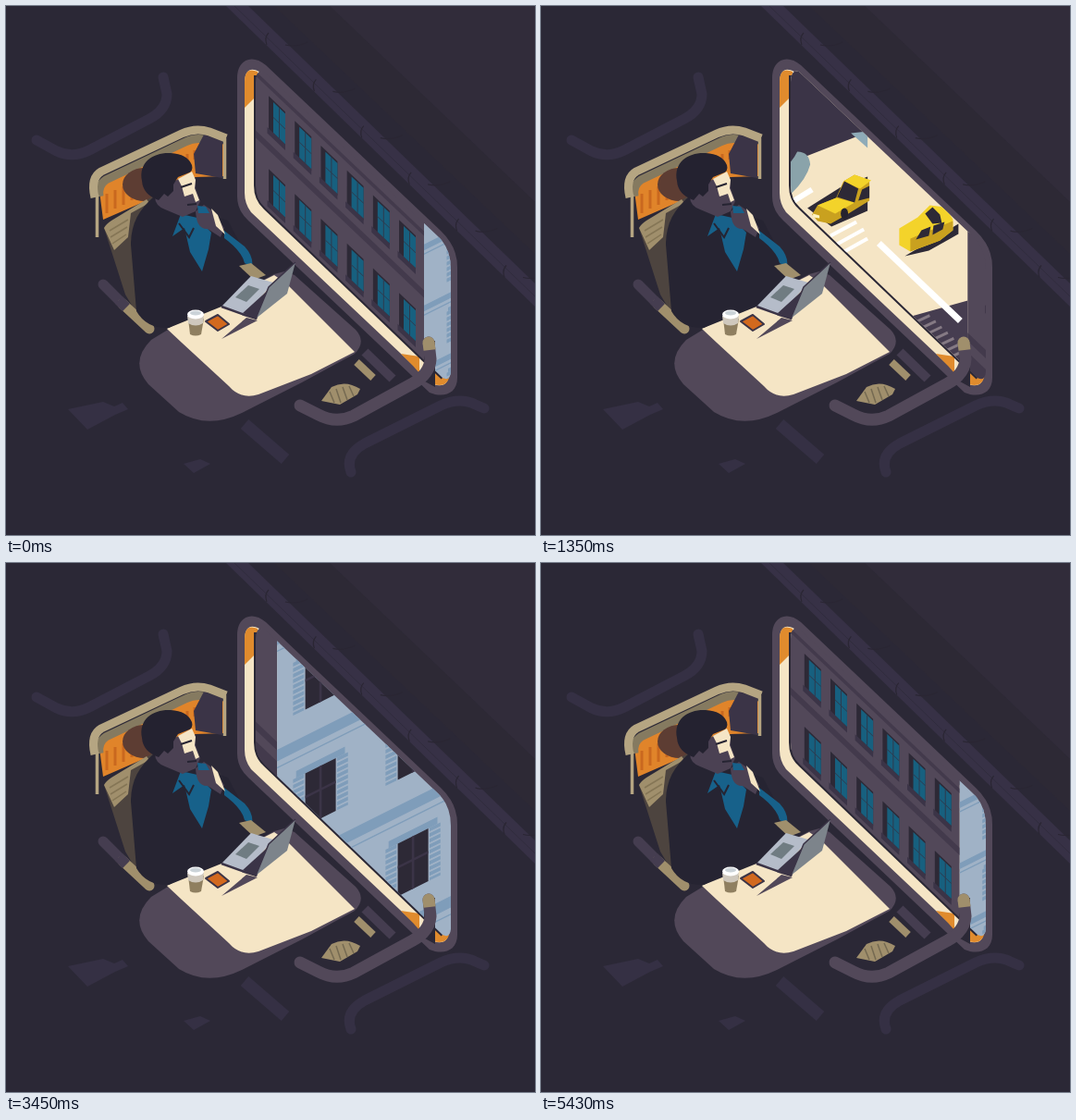
Write an HTML page that moves like this. It is 572x572 px and loops after 5.46 s.

```html
<!DOCTYPE html>
<html lang="en">
<head>
<meta charset="utf-8">
<title>Window seat</title>
<style>
html, body { margin: 0; width: 100%; height: 100%; overflow: hidden; background: #2b2836; }
svg { display: block; width: 100vw; height: 100vh; }
</style>
</head>
<body>
<svg viewBox="0 0 572 572" fill="none">
  <defs>
    <clipPath id="pane"><path d="M270 82Q270 68 279 71L467 249Q481 262 481 284V396Q480 406 472 402L280 218Q270 209 270 194Z"/></clipPath>
  </defs>

  <!-- carriage wall -->
  <path d="M350 0H572V212Z" fill="#312c3a"/>
  <path d="M290 0H350L572 212V268Z" fill="#2d2935"/>
  <path d="M238 0H262L572 300V325Z" fill="#373146"/>
  <path d="M247 0L572 314" stroke="#302c3d"/>
  <g id="joints" stroke="#2a2633" stroke-width="1.2"></g>

  <!-- faint furniture -->
  <g stroke="#353044" stroke-width="11" stroke-linecap="round">
    <path d="M33 145L55 157Q72 165 90 156L155 122Q174 112 174 95L170 77"/>
    <path d="M373 504Q366 485 388 473L470 432Q488 424 503 429L517 435"/>
    <path d="M258 452L302 490" stroke-width="13" stroke-linecap="butt"/>
  </g>
  <path d="M67 436L105 428L117 433L126 429L132 436L118 442L88 458ZM192 495L210 490L221 495L203 505Z" fill="#353044"/>

  <!-- window -->
  <path d="M250 78C250 58 266 51 281 64L470 243Q488 260 488 282V402C488 420 472 424 458 418L262 232Q250 221 250 206Z" fill="#524859"/>
  <path d="M258 84Q258 63 274 71L464 251Q479 264 479 284V398Q478 414 462 409L265 223Q258 214 258 202Z" fill="#f5e5c5"/>
  <path d="M258 110V82Q258 65 272 71V96ZM427 376L447 379V397L440 389ZM452 398L480 396Q479 414 462 409Z" fill="#e08b2d"/>
  <path d="M270 75V194Q270 209 280 218L472 402" stroke="#2b2836" stroke-width="4"/>
  <g clip-path="url(#pane)">
    <g id="world"><g id="city"></g><use id="again" href="#city"/></g>
  </g>

  <!-- seat -->
  <path d="M100 192L200 143L215 141L236 150V184L205 185L160 207L105 231Z" fill="#e0842a"/>
  <path d="M109 203V224M118 199V219M127 195V215M136 191V210M145 187V205M178 168V180M187 164V176M196 160V170M204 156V166" stroke="#c9681f" stroke-width="3"/>
  <path d="M101 206Q99 194 108 188L194 147Q204 142 214 144" stroke="#857a60" stroke-width="9"/>
  <path d="M203 160L214 139L234 146V186L205 181Z" fill="#3b3447"/>
  <path d="M98.500 250V204M236.500 143V187" stroke="#b5a582" stroke-width="3.500"/>
  <path d="M96 207Q91 186 103 179L190 138Q205 131 220 136L238 143" stroke="#b5a582" stroke-width="9"/>
  <ellipse cx="150" cy="193" rx="24" ry="18" fill="#5d3d33"/>
  <path d="M106 240L158 206L164 226L136 250L150 347L129 312Z" fill="#4d443f"/>
  <path d="M106 240Q108 236 114 232L152 209L155 213L135 224L132 250L117 264Z" fill="#a08f6c"/>
  <path d="M112 243L132 231M113 250L131 239M115 257L130 247" stroke="#857656" stroke-width="1.500"/>
  <path d="M105 301L128 324" stroke="#453d50" stroke-width="11" stroke-linecap="round"/>
  <path d="M126 322L155 349" stroke="#a08f6c" stroke-width="11" stroke-linecap="round"/>
  <path d="M122 318L130 326" stroke="#453d50" stroke-width="11"/>

  <!-- table -->
  <path d="M301 287L312 291L378 350Q390 363 377 376L320 407L255 440Q218 458 187 439L154 409Q133 385 157 361L180 347L290 290Z" fill="#524859"/>
  <path d="M174 349L290 291L303 300L377 374L330 398L273 420Q254 426 241 411L190 364Z" fill="#f5e5c5"/>

  <!-- passenger -->
  <path d="M160 206C143 221 135 236 135 258L141 330Q152 349 176 348L238 323L272 293L240 232L200 218Z" fill="#262432"/>
  <path d="M236 243L258 260Q268 271 266 282L258 278Q255 265 236 251Z" fill="#17618a"/>
  <path d="M252 281L265 278L281 291L268 296Z" fill="#a08f6c"/>
  <path d="M180 249L189 225L207 229L222 245L219 263L212 287L199 266L193 240Z" fill="#17618a"/>
  <path d="M187 235L198 250L203 240" stroke="#262432" stroke-width="2"/>
  <path d="M161 206L171 200L181 190L200 180L205 189V197L210 211L205 222L191 228L172 220Q161 216 161 206Z" fill="#4b4153"/>
  <path d="M186 187L201 179L205 188L204 197L209 210L205 212L202 203L193 206L190 195Z" fill="#f5e5c5"/>
  <path d="M189 196L201 192M196 215L206 214" stroke="#262432" stroke-width="2"/>
  <path d="M147 189C143 168 160 158 178 159Q196 160 201 172Q203 179 196 181L186 185L181 193V200L175 206L171 203L165 210Q148 204 147 189Z" fill="#242230"/>
  <path d="M205 222L214 215L224 222L236 240L232 250L218 241Q206 242 205 222Z" fill="#4b4153"/>
  <path d="M222 219L229 226L237 247L227 238Z" fill="#f5e5c5"/>
  <path d="M207 216L216 217L220 224L208 224Z" fill="#17618a"/>

  <!-- laptop, cup, phone -->
  <path d="M233 360L260 337L272 340Z" fill="#524859"/>
  <path d="M233 325L265 292L289 299L258 335Z" fill="#b5bcc9"/>
  <path d="M248 315L262 302L274 306L260 320Z" fill="#707c82"/>
  <path d="M233 325L258 334L271 338" stroke="#3b3447" stroke-width="2.500"/>
  <path d="M256 332L278 312L286 304L271 339Z" fill="#3b3447"/>
  <path d="M270 338L284 304L313 277L304 311Z" fill="#7d848b"/>
  <path d="M270 338L284 304L313 277" stroke="#3b3447" stroke-width="1.500"/>
  <path d="M197 338H214L211 355Q205 358 199 355Z" fill="#8f7f60"/>
  <path d="M196 335H214L213 343Q205 348 197 343Z" fill="#cfc8bd"/>
  <ellipse cx="205" cy="333.500" rx="9" ry="5" fill="#fff"/>
  <ellipse cx="205" cy="332" rx="6" ry="2.500" fill="#cbd3d8"/>
  <path d="M216 341L229 334L241 344L229 351Z" fill="#d2691e" stroke="#3b3447" stroke-width="2" stroke-linejoin="round"/>

  <!-- seat in front -->
  <path d="M388 374L418 403" stroke="#453d50" stroke-width="10"/>
  <path d="M379 385L397 402" stroke="#a08f6c" stroke-width="8"/>
  <path d="M341 427L352 412Q367 404 383 414L380 420L361 431Z" fill="#a08f6c"/>
  <path d="M350 417L355 429M357 414L362 429M364 412L369 426M371 411L376 422" stroke="#756a52" stroke-width="1.500"/>
  <path d="M452 362V392L442 400L464 412V362Z" fill="#2b2836"/>
  <path d="M318 432L338 442Q357 452 376 443L440 408Q458 398 459 382L457 364" stroke="#524859" stroke-width="13" stroke-linecap="round"/>
  <path d="M457 364L458 372" stroke="#a08f6c" stroke-width="13"/>
  <circle cx="457" cy="364" r="6.500" fill="#a08f6c"/>
</svg>
<script>
const SLOPE = 0.95, SPEED = 0.282, LAP = 1532, CYCLE = 5460;
const C = { wall: '#524859', shade: '#433a4c', dark: '#2d2936', back: '#3b3447', blue: '#17607f',
  pale: '#a0b2c6', steel: '#7f9dba', cream: '#f5e5c5' };
const el = id => document.getElementById(id);
const range = (n, f) => Array.from({ length: n }, (_, i) => f(i)).join('');
const rect = (x, y, w, h, f) => `<rect x="${x}" y="${y}" width="${w}" height="${h}" fill="${f}"/>`;
const fill = (d, f) => `<path d="${d}" fill="${f}"/>`;
const line = (d, c, w, extra = '') => `<path d="${d}" stroke="${c}" stroke-width="${w}" ${extra}/>`;
// Things placed by where they are seen at a given moment.
const seenAt = (t, s) => `<g transform="translate(${SPEED * t} ${SLOPE * SPEED * t})">${s}</g>`;

// Facade along the track.
function front(x0, x1, bands, windows) {
  return `<g transform="matrix(1 ${SLOPE} 0 1 0 0)">` + rect(x0, -600, x1 - x0, 1200, C.wall) +
    bands.map(([y, h]) => rect(x0, y, x1 - x0, h, C.shade)).join('') + windows + '</g>';
}

function sash(x, y, w, h) {
  const l = x - w / 2, t = y - h / 2;
  return rect(l - w * .38, t - 2, w * 1.38, h + 4, C.dark) +
    rect(l - w * .5, t + h, w * 1.5, h * .2, C.back) +
    rect(l, t, w, h, C.blue) +
    line(`M${l} ${t + h / 2}h${w}M${x} ${t}v${h}`, '#2d3a4e', 1);
}

// Facade along a side street.
function side(x, y, width, base, cols, gap, w, h) {
  let s = rect(0, base - 1500, width, 1500, C.pale);
  for (let top = base - 1500 + (y - base + 1500) % gap; top < base; top += gap) {
    const mid = top + h + (gap - h) * .5;
    s += rect(0, mid - gap * .05, width, gap * .1, C.steel) + rect(0, mid + gap * .1, width, 1.5, C.steel);
    for (const u of cols) {
      const shutter = w * .36;
      s += rect(u - w * .8, top - gap * .06, w * 1.6, gap * .06, C.steel) +
        line(`M${u - w * .72} ${top}v${h}M${u + w * .72} ${top}v${h}`, C.steel, shutter, 'stroke-dasharray="4 2"') +
        rect(u - w / 2, top, w, h, C.dark) +
        line(`M${u} ${top}v${h}M${u - w / 2} ${top + h * .45}h${w}`, C.back, w * .08);
    }
  }
  return `<g transform="matrix(1 -.5 0 1 ${x} 0)">${s}</g>`;
}

const taxi = fill('M415 339L450 317L480 305V342L441 359Z', C.dark) +
  fill('M420 346L426 336L446 328L454 310L466 303L482 309V331L456 347L440 356L426 353Z', '#c9a11f') +
  fill('M426 336L446 328L466 333L445 345ZM454 310L466 303L484 309L472 318Z', '#f3d32a') +
  fill('M447 327L455 310L470 318L466 333ZM470 331L474 319L482 315V328Z', C.dark) +
  fill('M421 345L428 347V350L421 349Z', '#fff3c0') +
  '<ellipse cx="455" cy="345" rx="4" ry="6" fill="#25222e"/>';

const cab = fill('M258 142L316 107V118L284 136Z', C.dark) +
  fill('M252 112L272 100L285 87L302 89L310 102V114L296 125L264 137L252 130Z', '#f3d32a') +
  fill('M264 123L310 104V114L296 125L264 137Z', '#c9a11f') +
  fill('M280 96L288 89L296 97L298 106L288 107ZM270 124L276 114L286 110L284 120ZM288 119L289 109L301 105L299 113Z', C.dark);

const truck = fill('M383 333L412 313L480 300V338L428 362Z', C.back) +
  fill('M428 266L455 250L482 264L453 280Z', '#e0842a') +
  fill('M428 266L453 280V338L428 326Z', '#e0842a') +
  fill('M453 280L506 254V312L453 338Z', '#c8682a') +
  fill('M402 318L411 296L427 286L448 299L450 340L428 351L404 337Z', '#e0842a') +
  line('M411 296L433 309L448 299M433 309L427 333V350', '#c8682a', 1.5) +
  fill('M404 318L411 298L432 310L426 332Z', C.blue) +
  fill('M434 319L447 311V325L433 332Z', C.blue) +
  line('M440 314V330', '#e0842a', 2) +
  fill('M404 335L427 347V353L404 341Z', C.back) +
  [[427, 352], [463, 335], [475, 329]].map(([x, y]) =>
    `<ellipse cx="${x}" cy="${y}" rx="6" ry="7" fill="#25222e"/>`).join('');

// Ground between two houses, x0 to x1 across the picture.
const ground = (x0, x1) => `<g transform="matrix(1 ${SLOPE} 0 1 0 0)">${rect(x0 - 60, -600, x1 - x0 + 62, 1200, C.cream)}</g>`;

const avenue = ground(647, 842) +
  seenAt(900,
    fill('M393 100V291L475 259V100Z', C.back) +
    fill('M462 258L480 274V256Z', '#8fabb8') +
    line('M394 335L420 319', '#fff', 6) +
    line('M447 378L476 362M455 386L480 372M440 369L468 354', '#fff', 4) + taxi) +
  seenAt(1830,
    fill('M215 221L326 190V330H215Z', '#463d50') +
    line('M230 128L318 212', '#fff', 7) +
    range(9, i => line(`M${268 + i * 6.5} ${214 + i * 6.2}l17 -8`, '#857a84', 3)) + cab);

const lane = ground(1614, 1800) +
  seenAt(4500,
    fill('M345 60V312H372L368 302L425 275L450 262V60Z', C.back) +
    fill('M345 60V180L450 266V60Z', '#483f52') +
    line('M345 180L450 266', C.blue, 1.5) + truck);

el('city').innerHTML =
  front(268, 452, [[-186, 5], [-122, 8]],
    range(6, i => sash(436.5 - 28.2 * i, -154, 13, 33) + sash(436.5 - 28.2 * i, -75, 13, 33))) +
  avenue +
  side(452, 475, 195.5, 628, [38, 87, 127, 176], 66, 15, 34) +
  seenAt(900, fill('M362 306Q392 303 404 278Q417 278 418 292Q414 308 396 325Z', '#8aa3aa')) +
  front(842, 1266, [[-85, 9], [-64, 20]], range(9, i => sash(879 + 44 * i, -155, 18, 44))) +
  lane +
  side(1266, 1167, 348.5, 1660, [47, 147, 218, 295], 126, 33, 57);

el('again').setAttribute('transform', `translate(${LAP} ${LAP * SLOPE})`);
el('joints').innerHTML = range(6, i => {
  const x = 284 + i * 51.4, y = 29 + i * 50.3;
  return `<path d="M${x} ${y}q-5 5 -2 13M${x + 18} ${y + 13}q12 3 24 -3"/>`;
});

function draw() {
  const t = Math.floor(performance.now() % CYCLE / 30) * 30;
  el('world').setAttribute('transform', `translate(${-SPEED * t} ${-SLOPE * SPEED * t})`);
  requestAnimationFrame(draw);
}
draw();
</script>
</body>
</html>
```
